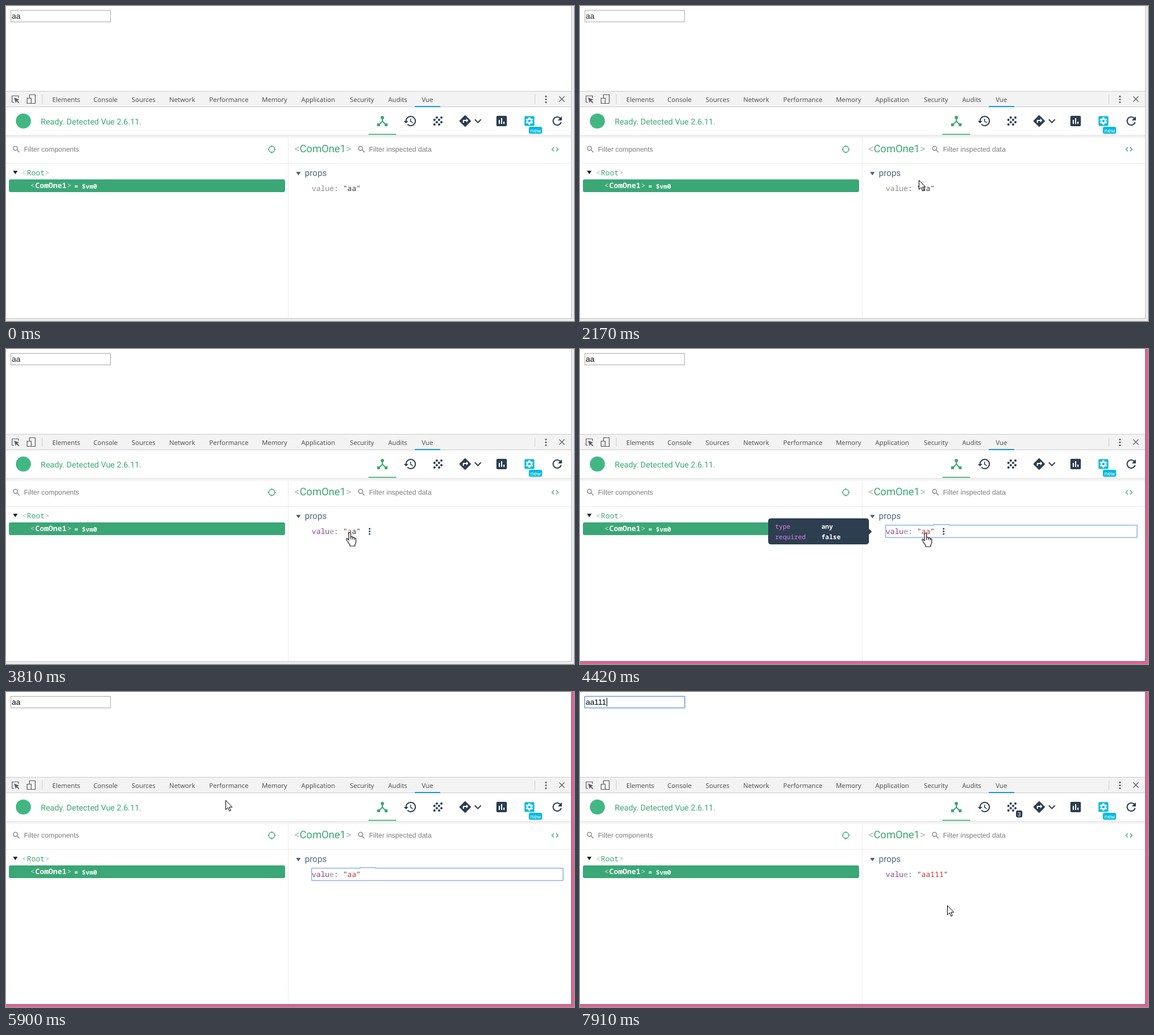
An HTML page that plays this animation: 981x545 px, repeating every 8000 ms.

```html
<!DOCTYPE html>
<html lang="en">
<head>
<meta charset="utf-8">
<title>Component inspector</title>
<style>
html, body { margin: 0; width: 100%; height: 100%; overflow: hidden; background: #fff; }
svg { display: block; width: 981px; height: 545px; text-rendering: geometricPrecision; }
.ui { font: 11.2px "Open Sans", sans-serif; fill: #474747; }
.arial { font-family: "Liberation Sans", Arial, sans-serif; }
.roboto { font-family: Roboto, sans-serif; }
.mono { font: 12.83px "Noto Sans Mono", monospace; }
.small { font-size: 11px; font-weight: 600; }
.pixel { font: 10px "Liberation Mono", monospace; fill: #fff; }
.hint { font-size: 12px; fill: #7d7d7d; }
.green { fill: #3ba776; }
.soft { fill: #b5b5b5; }
.dark { fill: #2c3e50; }
.line { fill: none; stroke: #5a5a5a; stroke-width: 1.2; }
</style>
</head>
<body>
<svg viewBox="0 0 981 545" xmlns="http://www.w3.org/2000/svg">
  <defs>
    <linearGradient id="shade" x2="0" y2="1">
      <stop stop-color="#000" stop-opacity=".09"/>
      <stop offset="1" stop-color="#000" stop-opacity="0"/>
    </linearGradient>
    <path id="search" transform="scale(.667)" fill="#858585" d="M15.5 14h-.79l-.28-.27C15.41 12.59 16 11.11 16 9.5 16 5.91 13.09 3 9.5 3S3 5.91 3 9.5 5.91 16 9.5 16c1.61 0 3.09-.59 4.23-1.57l.27.28v.79l5 4.99L20.49 19l-4.99-5zm-6 0C7.01 14 5 11.99 5 9.5S7.01 5 9.5 5 14 7.01 14 9.5 11.99 14 9.5 14z"/>
  </defs>

  <rect id="frame" width="981" height="545"/>
  <rect id="edge" width="977" height="541"/>
  <rect width="976" height="540" fill="#fff"/>

  <!-- page -->
  <rect id="field" fill="#fff"/>
  <text id="typed" class="arial" x="10" y="22" font-size="13.33"></text>
  <rect id="caret" y="10" width="1" height="15"/>
  <g id="highlight">
    <rect x="8" y="5" width="960" height="23" rx="3" fill="#68b6ff" fill-opacity=".36"/>
    <rect x="458" y="8" width="60" height="18" rx="2" fill="#6ab6fd"/>
    <text class="pixel" x="461" y="21"><tspan opacity=".7">&lt;</tspan>ComOne1<tspan opacity=".7">&gt;</tspan></text>
  </g>

  <!-- tool tabs -->
  <rect y="147" width="976" height="28" fill="#f3f3f3"/>
  <path d="M0 147.5H976M0 174.5H976M62.5 153V169M913.5 153V169" stroke="#ccc"/>
  <path class="line" d="M14 166.5H10.500V155.500H21.500V159"/>
  <path d="M14 158.500L23 162L19.300 163.300L23 167L21.700 168.200L18 164.600L16.800 168Z" fill="#5a5a5a"/>
  <path class="line" d="M40.500 159V153.500H50.500V168.500H44M36.500 159.500H43.500V168.500H36.500Z"/>
  <g id="tabs" class="ui"></g>
  <rect x="706" y="173" width="44" height="2" fill="#1a9ad0"/>
  <g fill="#5a5a5a"><circle cx="932.500" cy="156.500" r="1.500"/><circle cx="932.500" cy="161.500" r="1.500"/><circle cx="932.500" cy="166.500" r="1.500"/></g>
  <path class="line" d="M955.500 156.500L964.500 165.500M964.500 156.500L955.500 165.500" stroke-width="1.6"/>

  <!-- header -->
  <rect y="223" width="976" height="7" fill="url(#shade)"/>
  <circle cx="30" cy="199" r="13" fill="#41b883"/>
  <text class="roboto green" x="60" y="205" font-size="14">Ready. Detected Vue 2.6.11.</text>
  <rect x="626" y="221" width="48" height="2" fill="#62bd91"/>
  <g class="dark">
    <path class="green" transform="translate(638 187)" d="M17 16l-4-4V8.82C14.16 8.4 15 7.3 15 6c0-1.66-1.34-3-3-3S9 4.34 9 6c0 1.3.84 2.4 2 2.82V12l-4 4H3v5h5v-3.05l4-4.2 4 4.2V21h5v-5h-4z"/>
    <path transform="translate(686 187)" d="M13 3c-4.97 0-9 4.03-9 9H1l3.89 3.89.07.14L9 12H6c0-3.87 3.13-7 7-7s7 3.13 7 7-3.13 7-7 7c-1.93 0-3.68-.79-4.94-2.06l-1.42 1.42C8.27 19.99 10.51 21 13 21c4.97 0 9-4.03 9-9s-4.03-9-9-9zm-1 5v5l4.28 2.54.72-1.21-3.5-2.08V8H12z"/>
    <g id="grain" transform="translate(734 187)"></g>
    <path transform="translate(781 187)" d="M21.71 11.29l-9-9c-.39-.39-1.02-.39-1.41 0l-9 9c-.39.39-.39 1.02 0 1.41l9 9c.39.39 1.02.39 1.41 0l9-9c.39-.38.39-1.01 0-1.41zM14 14.5V12h-4v3H8v-4c0-.55.45-1 1-1h5V7.5l3.5 3.5-3.5 3.5z"/>
    <path transform="translate(803 187)" d="M7.41 8.59L12 13.17l4.59-4.58L18 10l-6 6-6-6z"/>
    <path transform="translate(844 187)" d="M19 3H5c-1.1 0-2 .9-2 2v14c0 1.1.9 2 2 2h14c1.1 0 2-.9 2-2V5c0-1.1-.9-2-2-2zM9 17H7v-7h2v7zm4 0h-2V7h2v10zm4 0h-2v-4h2v4z"/>
    <path transform="translate(940 187)" d="M17.65 6.35C16.2 4.9 14.21 4 12 4c-4.42 0-7.99 3.58-7.99 8s3.57 8 7.99 8c3.73 0 6.84-2.55 7.73-6h-2.08c-.82 2.33-3.04 4-5.65 4-3.31 0-6-2.69-6-6s2.69-6 6-6c1.66 0 3.14.69 4.22 1.78L13 11h7V4l-2.35 2.35z"/>
  </g>
  <g transform="translate(904 199)" fill="#04b9e0">
    <rect x="-8.500" y="-8.500" width="17" height="17" rx="1.500"/>
    <path d="M0-6.500V6.500M-5.600-3.250L5.600 3.250M-5.600 3.250L5.600-3.250" stroke="#fff" stroke-width="3"/>
    <circle r="4.800" fill="#fff"/><circle r="2.200"/>
    <rect x="-1" y="10" width="23" height="12" rx="3"/>
    <text class="pixel" x="1.500" y="20">new</text>
  </g>
  <g id="badge">
    <rect class="dark" x="753" y="205" width="11" height="12" rx="3"/>
    <text id="count" class="roboto" x="758.500" y="214.500" font-size="10" text-anchor="middle" fill="#fff"></text>
  </g>

  <!-- panes -->
  <path d="M487.500 224V540M0 272.500H976" stroke="#ececec"/>
  <use href="#search" x="10" y="240"/>
  <text class="arial hint" x="31" y="252">Filter components</text>
  <g fill="none" stroke="#3ba776" stroke-width="1.200">
    <circle cx="459" cy="248" r="5.300"/>
    <path d="M459 241V244M459 252V255M452 248H455M463 248H466"/>
    <path d="M946.300 244.500L942.800 248L946.300 251.500M950.200 244.500L953.700 248L950.200 251.500"/>
  </g>
  <text class="roboto green" x="498" y="253" font-size="18"><tspan class="soft">&lt;</tspan>ComOne1<tspan class="soft">&gt;</tspan></text>
  <use href="#search" x="606" y="240"/>
  <text class="arial hint" x="627" y="252">Filter inspected data</text>

  <path d="M12 285H20L16 291Z" fill="#222"/>
  <g class="mono green"><text class="soft" x="27.500" y="293">&lt;</text><text x="36" y="293">Root</text><text class="soft" x="67.500" y="293">&gt;</text></g>
  <rect class="green" x="5" y="300" width="477" height="22" rx="3"/>
  <g class="mono" fill="#fff">
    <text x="42" y="315" opacity=".75">&lt;</text><text x="50.500" y="315" font-weight="600">ComOne1</text><text x="105.500" y="315" opacity=".75">&gt;</text>
    <text class="small" x="118" y="316">=</text><text class="small" x="131" y="316">$vm0</text>
  </g>

  <path d="M501 287H509L505 293Z" fill="#4d6276"/>
  <text class="roboto" x="516" y="294" font-size="15" fill="#4d6a85">props</text>
  <path id="focus" d="M529 304.800H611.500V303.800H638V304.800H961Q962.200 304.800 962.200 306V325Q962.200 326.200 961 326.200H529Q527.800 326.200 527.800 325V306Q527.800 304.800 529 304.800Z" fill="none" stroke="#8fb4f5" stroke-width="1.600"/>
  <text class="mono" x="528" y="320" fill="#444"><tspan id="key"></tspan><tspan id="keyEnd" fill="#8c8c8c">e</tspan>: "<tspan id="first"></tspan><tspan id="rest"></tspan>"</text>
  <g id="more" class="dark"><circle cx="628" cy="311" r="1.500"/><circle cx="628" cy="315.500" r="1.500"/><circle cx="628" cy="320" r="1.500"/></g>

  <g id="tooltip">
    <path class="dark" d="M330 293H494Q499 293 499 298V311L504 316L499 321V333Q499 338 494 338H330Q325 338 325 333V298Q325 293 330 293Z"/>
    <g class="mono small" fill="#fff">
      <g fill="#e07ff0" font-weight="400"><text x="337" y="311">type</text><text x="337" y="329">required</text></g>
      <text x="417" y="311">any</text><text x="417" y="329">false</text>
    </g>
  </g>

  <!-- pointers, each with its hot spot at 0,0 -->
  <path id="arrow" d="M.5 .5V16.500L4.200 13L6.800 19L9.200 18L6.700 12.200H11.700Z" fill="#fff" stroke="#000"/>
  <g id="hand" fill="#fff" stroke="#1b1b2b" stroke-width="1.200" stroke-linejoin="round">
    <path d="M-2 1.500Q-2-.5 -.3-.5T1.500 1.500V7.200Q4 5.800 4.800 8Q7.200 7 8 9.200Q10.500 8.700 10.500 11.500V15.500Q10.500 18.500 8.700 20V23H-.2V20.500Q-2.500 18 -3.600 15.500L-6 12Q-6.700 9.700 -4.500 10L-2 12.500Z"/>
    <path d="M1.500 7V11.500M4.800 8V11.500M8 9.200V12" fill="none"/>
  </g>
  <path id="beam" d="M-3-8H-.5L0-7.500L.5-8H3M0-7.500V7.500M-3 8H-.5L0 7.500L.5 8H3" fill="none" stroke="#000"/>
</svg>
<script>
const $ = id => document.getElementById(id);
const LOOP = 8000;

const tabs = { Elements: 80, Console: 151, Sources: 217, Network: 282, Performance: 351, Memory: 442,
  Application: 510, Security: 594, Audits: 660, Vue: 718 };
$('tabs').innerHTML = Object.entries(tabs)
  .map(([name, x]) => `<text x="${x}" y="166">${name}</text>`).join('');
$('grain').innerHTML = [[10, 6], [18, 6], [6, 10], [14, 10], [10, 14], [18, 14], [6, 18], [14, 18]]
  .map(([x, y]) => `<circle cx="${x}" cy="${y}" r="2"/>`).join('');

// Pointer moves as time, x, y; the pointer is hidden between moves.
const moves = [
  [[160, 652, 385], [770, 124, 18], [1090, 124, 18], [1470, 470, 235], [1850, 765, 331], [1950, 765, 331],
   [2040, 650, 292], [2170, 585, 301], [2410, 575, 303], [2580, 580, 316], [2900, 513, 315], [3350, 575, 318],
   [3420, 575, 318], [3590, 592, 318], [3730, 594, 318], [4190, 594, 318], [4270, 597, 319], [4420, 597, 319],
   [4580, 570, 350], [4960, 430, 312]],
  [[5510, 526, 396], [5900, 380, 187], [6290, 114, 55], [6580, 63, 15], [6830, 63, 15]],
  [[7370, 70, 20], [7760, 598, 354], [7840, 615, 378], [7910, 634, 369], [LOOP, 634, 369]]
];
const strokes = [6990, 7140, 7290];

function pointerAt(t) {
  const path = moves.find(m => t >= m[0][0] && t < m[m.length - 1][0]);
  if (!path) return null;
  const i = path.findIndex(p => p[0] > t);
  const [t0, x0, y0] = path[i - 1], [t1, x1, y1] = path[i];
  const k = (t - t0) / (t1 - t0);
  return { x: Math.round(x0 + (x1 - x0) * k), y: Math.round(y0 + (y1 - y0) * k) };
}

function pointerKind({ x, y }) {
  if (x > 8 && x < 181 && y > 7 && y < 28) return 'beam';
  if (x > 527 && x < 963 && y > 304 && y < 327) return 'hand';
  return 'arrow';
}

const show = (id, on) => $(id).setAttribute('display', on ? 'inline' : 'none');
const fill = (id, color) => $(id).setAttribute('fill', color);
function set(id, attrs) {
  for (const name in attrs) $(id).setAttribute(name, attrs[name]);
}

function draw(t) {
  const pointer = pointerAt(t);
  const kind = pointer && pointerKind(pointer);
  for (const id of ['arrow', 'hand', 'beam']) show(id, id === kind);
  if (pointer) set(kind, { transform: `translate(${pointer.x} ${pointer.y})` });

  const clicked = t >= 3890, typing = t >= 6580, hovered = t >= 2580;
  fill('frame', clicked ? '#e0648f' : '#ebebeb');
  fill('edge', clicked ? '#b64d74' : '#c8c8c8');
  show('focus', clicked && !typing);
  show('tooltip', t >= 4040 && t < 5360);
  show('highlight', t >= 5140 && t < 5360);
  show('more', kind === 'hand');

  const count = strokes.filter(s => t >= s).length;
  const value = 'aa' + '1'.repeat(count);
  $('typed').textContent = value;
  fill('typed', clicked ? '#000' : '#222');
  show('caret', typing);
  set('caret', { x: Math.round(10 + 7.2 * value.length) });
  set('field', typing
    ? { x: 8, y: 7.500, width: 173, height: 20, rx: 1, stroke: '#6c9df0', 'stroke-width': 1.600 }
    : { x: 8.500, y: 7.500, width: 172, height: 20, rx: 0, stroke: '#a9a9a9', 'stroke-width': 1 });
  show('badge', count > 0);
  $('count').textContent = count;

  $('key').textContent = 'valu';
  fill('key', hovered ? '#8f3a9c' : '#8c8c8c');
  $('first').textContent = value[0];
  $('rest').textContent = value.slice(1);
  fill('first', clicked ? '#c9302c' : hovered ? '#b84a45' : '#333');
  fill('rest', clicked ? '#c9302c' : '#333');
}

function tick() {
  draw(performance.now() % LOOP);
  requestAnimationFrame(tick);
}
tick();
</script>
</body>
</html>
```
